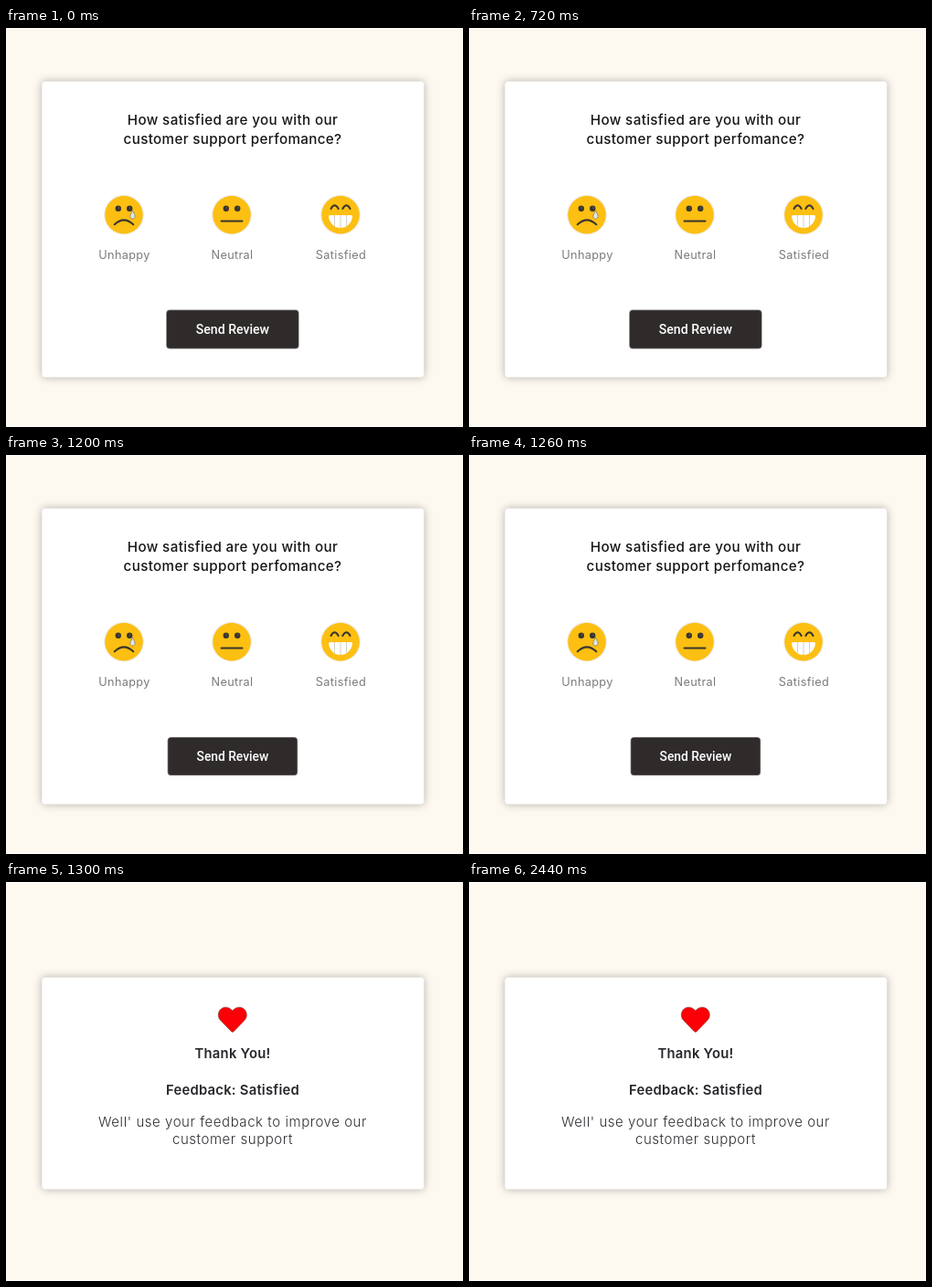
These frames come from a looping animation (500x437 px, 3.2 s). An HTML page with a canvas:

```html
<!DOCTYPE html>
<html lang="en">
<head>
<meta charset="utf-8">
<title>Feedback card</title>
<style>
html, body { margin: 0; width: 100%; height: 100%; overflow: hidden; background: #fdf8f0; }
canvas { display: block; }
</style>
</head>
<body>
<canvas id="stage" width="500" height="437"></canvas>
<script>
const ctx = document.getElementById('stage').getContext('2d');
const LOOP = 3200, PRESS = 1200, SENT = 1300;
const YELLOW = '#fcbf12', DARK = '#393531', INK = '#17171a';
const HEART = new Path2D('M462.3 62.6C407.5 15.9 326 24.3 275.7 76.2L256 96.5l-19.7-20.3C186.1 24.3 104.5 15.9 49.7 62.6c-62.8 53.6-66.1 149.8-9.9 207.9l193.5 199.8c12.5 12.9 32.8 12.9 45.3 0l193.5-199.8c56.3-58.1 53-154.3-9.8-207.9z');

function text(str, x, y, font, color, spacing = 0) {
  ctx.font = font;
  ctx.letterSpacing = spacing + 'px';
  ctx.fillStyle = color;
  ctx.textAlign = 'center';
  ctx.fillText(str, x, y);
}

function box(x, y, w, h, r, color) {
  ctx.fillStyle = color;
  ctx.beginPath();
  ctx.roundRect(x, y, w, h, r);
  ctx.fill();
}

function disc(x, y, r, color) {
  ctx.fillStyle = color;
  ctx.beginPath();
  ctx.arc(x, y, r, 0, Math.PI * 2);
  ctx.fill();
}

function curve(x1, y1, cx, cy, x2, y2, width = 2) {
  ctx.strokeStyle = DARK;
  ctx.lineWidth = width;
  ctx.lineCap = 'round';
  ctx.beginPath();
  ctx.moveTo(x1, y1);
  ctx.quadraticCurveTo(cx, cy, x2, y2);
  ctx.stroke();
}

function card(y, h) {
  ctx.save();
  ctx.shadowColor = 'rgba(0,0,0,.3)';
  ctx.shadowBlur = 10;
  box(39.3, y, 418, h, 4, '#fff');
  ctx.restore();
}

// Draws a face around its own centre.
function face(x, features) {
  ctx.save();
  ctx.translate(x, 204.6);
  disc(0, 0, 21.9, '#efece5');
  disc(0, 0, 20.8, YELLOW);
  features();
  ctx.restore();
}

function eyes() {
  for (const x of [-6.2, 6.2]) {
    disc(x, -6.9, 3.2, DARK);
    disc(x + 0.7, -7.7, 0.6, '#8a7440');
  }
}

function sad() {
  eyes();
  curve(-10.3, 10.7, 0, 0.8, 10.3, 10.7);
  ctx.fillStyle = '#dfe6e8';
  ctx.strokeStyle = '#94836a';
  ctx.lineWidth = 0.9;
  ctx.beginPath();
  ctx.moveTo(9.5, -4.5);
  ctx.bezierCurveTo(11, -1.5, 12.2, 0, 12.2, 1.6);
  ctx.bezierCurveTo(12.2, 5.2, 6.8, 5.2, 6.8, 1.6);
  ctx.bezierCurveTo(6.8, 0, 8, -1.5, 9.5, -4.5);
  ctx.fill();
  ctx.stroke();
}

function neutral() {
  eyes();
  curve(-11.5, 6.9, 0, 6.9, 11.5, 6.9);
}

function happy() {
  curve(-10.5, -6.7, -6.5, -14, -2.3, -6.7);
  curve(2.3, -6.7, 6.5, -14, 10.5, -6.7);
  ctx.save();
  ctx.beginPath();
  ctx.moveTo(-13, 1.8);
  ctx.quadraticCurveTo(-13.2, 0.3, -11.5, 0.3);
  ctx.lineTo(11.5, 0.3);
  ctx.quadraticCurveTo(13.2, 0.3, 13, 1.8);
  ctx.bezierCurveTo(11, 18.4, -11, 18.4, -13, 1.8);
  ctx.fillStyle = '#fff';
  ctx.fill();
  ctx.clip();
  ctx.fillStyle = '#d3d0ca';
  for (const x of [-6.5, 0, 6.5]) ctx.fillRect(x - 0.5, 0, 1, 16);
  ctx.restore();
}

function button(scale) {
  ctx.save();
  ctx.translate(247.9, 330);
  ctx.scale(scale, scale);
  box(-72.7, -21.5, 145.4, 43, 4, '#8b8888');
  box(-72, -20.8, 144, 41.6, 3.5, '#2f2b2b');
  text('Send Review', 0, 5, '500 14.1px Roboto, sans-serif', '#fff');
  ctx.restore();
}

function survey(pressed) {
  card(58.5, 324);
  const title = '500 15.2px Inter, sans-serif';
  text('How satisfied are you with our', 248, 105.5, title, INK, 0.35);
  text('customer support perfomance?', 248, 126.5, title, INK, 0.35);
  const options = [[129, 'Unhappy', sad], [247, 'Neutral', neutral], [366, 'Satisfied', happy]];
  for (const [x, label, features] of options) {
    face(x, features);
    text(label, x + 0.5, 252.5, '12.7px Inter, sans-serif', '#7c7c7f', 0.35);
  }
  button(pressed ? 0.98 : 1);
}

function heart() {
  ctx.save();
  ctx.translate(232.3, 135.2);
  ctx.scale(31 / 512, 31 / 512);
  ctx.fillStyle = '#fb0006';
  ctx.strokeStyle = '#7c3a30';
  ctx.lineWidth = 10;
  ctx.fill(HEART);
  ctx.stroke(HEART);
  ctx.restore();
}

function thanks() {
  card(104.5, 232);
  heart();
  const strong = '600 14.8px Inter, sans-serif';
  text('Thank You!', 248, 193.3, strong, '#26262b', 0.25);
  text('Feedback: Satisfied', 248, 233, strong, '#26262b', 0.25);
  const body = '300 15px Inter, sans-serif';
  text("Well' use your feedback to improve our", 248, 268.3, body, '#2e2e33', 0.55);
  text('customer support', 248, 287.3, body, '#2e2e33', 0.55);
}

function draw(now) {
  const t = now % LOOP;
  ctx.fillStyle = '#fdf8f0';
  ctx.fillRect(0, 0, 500, 437);
  ctx.fillStyle = '#fff';
  ctx.fillRect(0, 0, 500, 1);
  ctx.fillRect(0, 436, 500, 1);
  if (t < SENT) survey(t >= PRESS);
  else thanks();
}

const start = performance.now();
function tick() {
  draw(performance.now() - start);
  requestAnimationFrame(tick);
}
tick();
</script>
</body>
</html>
```
